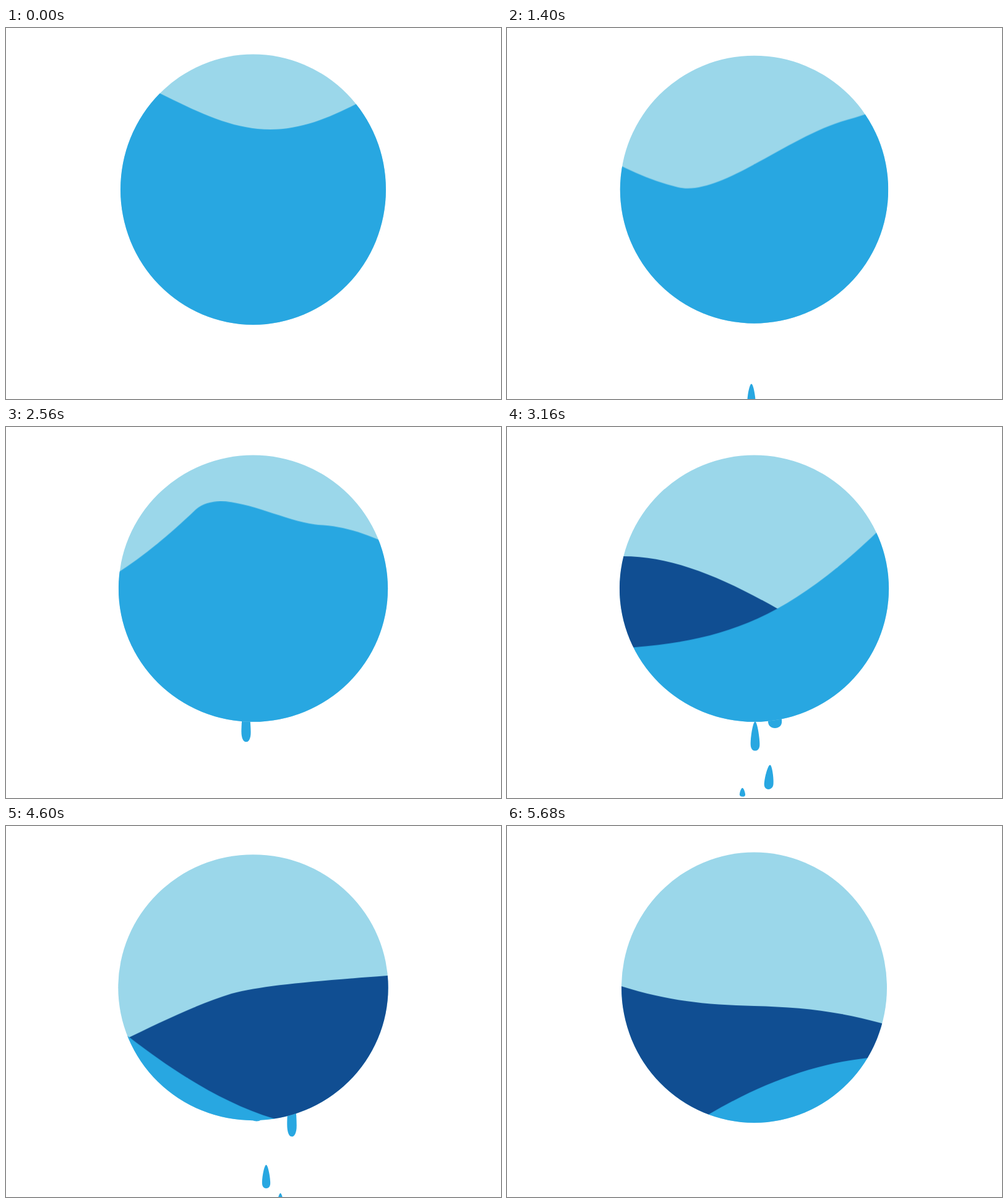
Animation, 800 px wide and 600 px high, one loop 5.72 s. Source, as an HTML page without scripts:

```html
<!DOCTYPE html>
<html lang="en">
<head>
<meta charset="utf-8">
<title>Draining water ball</title>
<style>
  :root { --loop: 5720ms; --water: #28a7e1; }
  html, body { margin: 0; width: 100%; height: 100%; overflow: hidden; background: #fff; }
  svg { position: absolute; left: 0; top: 0; width: 800px; height: 600px; }

  .ball {
    position: absolute; left: 0; top: 0; width: 800px; height: 600px;
    background: #9bd7ea;
    animation: pulse calc(var(--loop) / 6) cubic-bezier(.37, 0, .63, 1) infinite alternate;
  }
  @keyframes pulse {
    from { clip-path: ellipse(214.5px 218.7px at 399.5px 261.2px); }
    to   { clip-path: ellipse(218.5px 214.7px at 399.5px 261.2px); }
  }

  /* The two waves roll in opposite directions while the level sinks */
  .back  { fill: #104e92; animation: back var(--loop) linear infinite; }
  .front { fill: var(--water); animation: front var(--loop) linear infinite; }
  @keyframes front {
    0%      { transform: translate(0, 84px); }
    14.685% { transform: translate(440px, 150px); }
    34.965% { transform: translate(1090px, 205px); }
    55.245% { transform: translate(1650px, 278px); }
    68.531% { transform: translate(2160px, 405px); }
    80.42%  { transform: translate(2680px, 420px); }
    99.301% { transform: translate(3260px, 450px); }
    100%    { transform: translate(3281px, 451px); }
  }
  @keyframes back {
    0%      { transform: translate(880px, 200px); }
    14.685% { transform: translate(500px, 210px); }
    34.965% { transform: translate(0, 225px); }
    55.245% { transform: translate(-520px, 270px); }
    68.531% { transform: translate(-890px, 285px); }
    80.42%  { transform: translate(-1135px, 339px); }
    99.301% { transform: translate(-1660px, 360px); }
    100%    { transform: translate(-1679px, 361px); }
  }

  /* --s is the moment, in ms, when a drip starts to swell */
  .drip, .bit {
    fill: var(--water);
    animation: fall var(--loop) linear infinite;
    animation-delay: calc(var(--s) * 1ms - var(--loop));
  }
  .drip { animation-name: fall, stretch; }
  @keyframes fall {
    0%      { translate: 0 462px; }
    5.245%  { translate: 0 474px; }
    8.741%  { translate: 0 484px; }
    11.189% { translate: 0 490px; }
    12.937% { translate: 0 502px; }
    13.986% { translate: 0 523px; }
    15.734% { translate: 0 585px; }
    16.783% { translate: 0 640px; }
    17.5%, 100% { translate: 0 720px; }
  }
  @keyframes stretch {
    0%, 8.741% { scale: 1.4 1; }
    11.189% { scale: 1.15 1.6; }
    12.937% { scale: 1.1 2.2; }
    13.986% { scale: 1.05 1.25; }
    15.734%, 100% { scale: .95 1; }
  }
</style>
</head>
<body>
<svg viewBox="0 0 800 600">
  <defs>
    <path id="d" d="M0-38C3-38 7-18 7-8C7-3 4 0 0 0S-7-3-7-9C-7-20-3-38 0-38Z"/>
  </defs>
  <g transform="translate(398)"><use href="#d" class="drip" style="--s:-330"/></g>
  <g transform="translate(434)"><use href="#d" class="drip" style="--s:-110"/></g>
  <g transform="translate(410.5)"><use href="#d" class="drip" style="--s:-60"/></g>
  <g transform="translate(452.5)"><use href="#d" class="drip" style="--s:100"/></g>
  <g transform="translate(395)"><use href="#d" class="drip" style="--s:470"/></g>

  <g transform="translate(435)"><use href="#d" class="bit" style="--s:1245" transform="scale(.74 .84)"/></g>
  <g transform="translate(413)"><use href="#d" class="bit" style="--s:1258" transform="scale(.45 .32)"/></g>
  <g transform="translate(355.5)"><use href="#d" class="drip" style="--s:1430" transform="scale(.58 1)"/></g>
  <g transform="translate(412.5)"><use href="#d" class="drip" style="--s:1480"/></g>
  <g transform="translate(388)"><use href="#d" class="drip" style="--s:1800"/></g>

  <g transform="translate(380.5)"><use href="#d" class="bit" style="--s:2247" transform="scale(.65 .37)"/></g>
  <g transform="translate(422.5)"><use href="#d" class="drip" style="--s:2260" transform="skewX(-4) scale(1.12 1.04)"/></g>
  <g transform="translate(401)"><use href="#d" class="drip" style="--s:2360"/></g>
  <g transform="translate(433)"><use href="#d" class="drip" style="--s:2590" transform="scale(1.25 1)"/></g>

  <g transform="translate(390.5)"><use href="#d" class="drip" style="--s:2970"/></g>
  <g transform="translate(367)"><use href="#d" class="drip" style="--s:3020"/></g>
  <g transform="translate(408.5)"><use href="#d" class="drip" style="--s:3180"/></g>
  <g transform="translate(435)"><use href="#d" class="drip" style="--s:3480"/></g>
  <g transform="translate(351)"><use href="#d" class="drip" style="--s:3550"/></g>

  <g transform="translate(443.5)"><use href="#d" class="drip" style="--s:3650"/></g>
  <g transform="translate(420.5)"><use href="#d" class="drip" style="--s:3700"/></g>
  <g transform="translate(462)"><use href="#d" class="drip" style="--s:3860"/></g>
  <g transform="translate(405)"><use href="#d" class="drip" style="--s:4230"/></g>
  <g transform="translate(428)"><use href="#d" class="drip" style="--s:4600"/></g>
</svg>

<div class="ball">
  <svg viewBox="0 0 800 600">
    <path class="back" d="M-1100 60H0C200 60 330 100 420 100C470 100 505 72 548 40L610-6
      C650-36 670-61 708-61C785-61 865-29 958 24C1030 65 1130 80 1220 52
      C1295 28 1410-41 1500-68C1550-81 1620-87 1751-97C1790-101 1815-111 1845-101
      C1925-76 1985-71 2060-69C2130-67 2190-62 2266-41L2400 0V900H-1100Z"/>
    <path class="front" d="M-3150 100C-3080 100-3000 54-2934 16C-2849-34-2763-66-2677-75
      S-2530-115-2482-79C-2408-22-2330 28-2248 53S-2040-50-1958-60
      C-1915-65-1870-68-1835-68C-1760-68-1690-33-1609 10S-1500 85-1444 78
      C-1300 66-1200 33-1054-107C-1010-145-920-88-856-82C-725-77-620 47-478 81
      C-410 97-300-2-205-28C-140-46-75-78-15-78C30-78 73-64 111-43S205 0 249 22
      C310 52 365 80 427 80C475 80 520 62 565 39L800 0V900H-3150Z"/>
  </svg>
</div>
</body>
</html>
```
